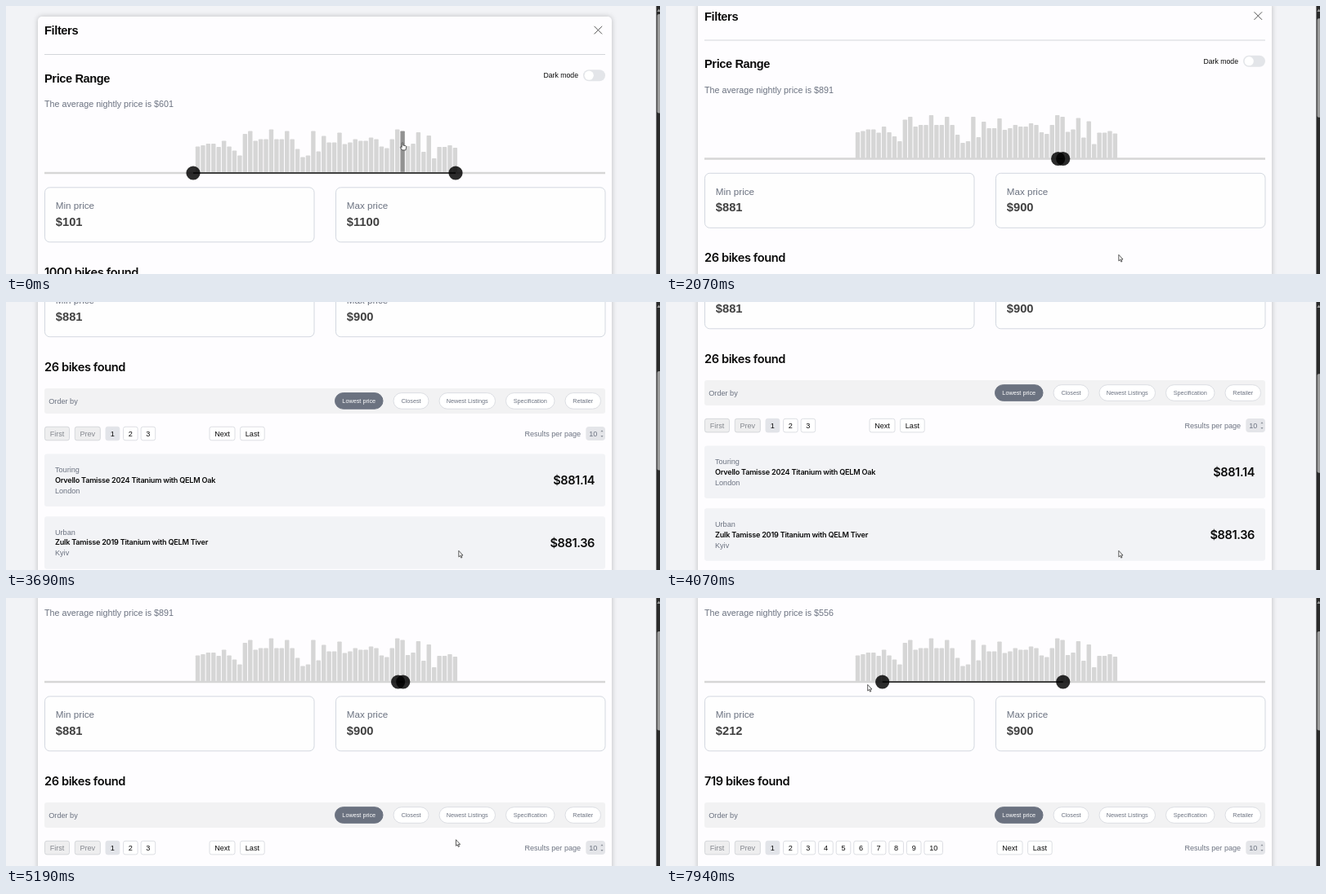
An HTML page that plays this animation: 800 px wide and 329 px high, repeating every 8 s.

```html
<!DOCTYPE html>
<html lang="en">
<head>
<meta charset="utf-8">
<title>Bike filters</title>
<style>
  html, body { margin: 0; width: 100%; height: 100%; overflow: hidden; background: #f2f3f6; }
  svg { display: block; width: 100vw; height: 100vh; }
  text { font-family: "Liberation Sans", Arial, sans-serif; font-size: 9.1px; fill: #6b7280; white-space: pre; }
  .head { font-size: 14.56px; font-weight: 700; letter-spacing: -.025em; fill: #0a0a0a; }
  .inter { font-family: Inter, sans-serif; font-weight: 600; letter-spacing: -.025em; fill: #0a0a0a; }
  .big { font-size: 14.56px; }
  .value { font-size: 14.7px; font-weight: 700; fill: #404040; }
  .label { font-size: 11.65px; }
  .average { font-size: 10.72px; }
  .small { font-size: 8.7px; fill: #0a0a0a; }
  .pill { font-size: 7.28px; }
  .dark { fill: #0a0a0a; }
  .white { fill: #fff; }
  .muted { fill: #85888f; }
  .middle { text-anchor: middle; }
  .end { text-anchor: end; }
  #card { filter: drop-shadow(0 0 3px rgba(0, 0, 0, .22)); }
</style>
</head>
<body>
<svg id="stage" viewBox="0 0 800 329" preserveAspectRatio="none"></svg>
<script>
const LOOP = 8000;
const FULL = { min: 101, max: 1100 };
const PICK = { min: 881, max: 900 };
const FINAL_MIN = 212;
const HOVERED = 39;
const BAR_STEP = 6.426;
const heights = [
  32, 33.5, 35.5, 35.5, 31.5, 39, 32, 27, 21, 47.5, 51, 39, 41, 41, 53, 41, 41, 51, 41, 29,
  19, 21, 51, 26, 45, 37, 37, 49, 35, 37, 41, 39, 39, 43, 41, 32, 30, 41, 53, 51,
  32.5, 35.5, 49.5, 25.5, 45.5, 17.5, 31.5, 31.5, 33.5, 30.5];

const scrollKeys = [[0, 0], [1000, 0], [1400, 17.5], [2350, 17.5], [3000, 214],
  [3450, 214], [3800, 257], [4250, 257], [4827, 102]];
const minKeys = [[6350, PICK.min], [7700, FINAL_MIN]];
const cursorX = [[600, 485], [1300, 553.8], [5050, 553.8], [6200, 472], [6350, 472], [7700, 257], [7880, 246.7]];
const cursorY = [[600, 167.5], [1300, 305.3], [5050, 305.3], [6200, 97.5], [6350, 97.5], [7700, 100], [7880, 106.3]];

function valueAt(keys, t) {
  if (t <= keys[0][0]) return keys[0][1];
  for (let i = 1; i < keys.length; i++) {
    const [t0, a] = keys[i - 1], [t1, b] = keys[i];
    if (t < t1) {
      const u = (t - t0) / (t1 - t0);
      return a + (b - a) * u * u * (3 - 2 * u);
    }
  }
  return keys[keys.length - 1][1];
}

const text = (x, y, content, cls = '', id = '') =>
  `<text x="${x}" y="${y}" class="${cls}"${id && ` id="${id}"`}>${content}</text>`;
const box = (x, y, w, h, r, fill, stroke = 'none', extra = '') =>
  `<rect x="${x}" y="${y}" width="${w}" height="${h}" rx="${r}" fill="${fill}" stroke="${stroke}" ${extra}/>`;
const button = (x, w, label, fill = '#fff', cls = 'dark', stroke = '#dcdee3') =>
  box(x, 400.3, w, 16.6, 2.5, fill, stroke) + text(x + w / 2, 411.8, label, cls + ' middle');
const pill = (x, w, label, active) =>
  box(x, 358.7, w, 19.6, 9.8, active ? '#6b7280' : '#fff', active ? '#6b7280' : '#dcdee3') +
  text(x + w / 2, 371.1, label, 'pill middle' + (active ? ' white' : ''));
const field = (x, label, id) =>
  box(x + .5, 222.8, 329.5, 67, 6, '#fefefe', '#d3d8e0') +
  text(x + 13.8, 249, label, 'label') + text(x + 13.8, 269.7, '', 'value', id);
const item = (y, kind, name, city, price) =>
  box(47, y, 686, 64.5, 3, '#f2f3f6') +
  text(60, y + 22.3, kind) + text(60, y + 35.2, name, 'inter') + text(60, y + 48.2, city) +
  text(720, y + 37.4, price, 'inter big end');
const bar = (h, i) =>
  box((231.8 + i * BAR_STEP).toFixed(2), 204.5 - h, 5.4, h, .8, '#d6d6d6', 'none', `id="bar${i}"`);

const stage = document.getElementById('stage');
stage.innerHTML = `
  <g id="page">
    ${box(39, 13, 702, 800, 5, '#fefdff', 'none', 'id="card"')}
    ${text(47, 35.2, 'Filters', 'head')}
    <path d="M719.5 24.8l9.6 9.6m0-9.6l-9.6 9.6" stroke="#555" stroke-width="1"/>
    <path d="M47 59.5H733" stroke="#d3d6da"/>
    ${text(47, 93.5, 'Price Range', 'head')}
    ${text(657.5, 88.3, 'Dark mode', 'small')}
    ${box(706, 78.2, 27, 14, 7, '#e3e5e9')}
    <circle cx="713.2" cy="85.2" r="5.6" fill="#fff"/>
    ${text(47, 124, '', 'average', 'average')}
    ${heights.map(bar).join('')}
    <path d="M47 205H733" stroke="#d6d6d6" stroke-width="2.4"/>
    <path id="range" stroke="#111" stroke-width="1.4"/>
    <circle id="minKnob" cy="205" r="8.6" fill="#000" fill-opacity=".83"/>
    <circle id="maxKnob" cy="205" r="8.6" fill="#000" fill-opacity=".83"/>
    ${field(47, 'Min price', 'minPrice')}
    ${field(403, 'Max price', 'maxPrice')}
    ${text(47, 331.6, '', 'inter big', 'found')}
    ${box(47, 353, 686, 31, 3, '#f2f2f3')}
    ${text(52.3, 371.9, 'Order by')}
    ${pill(402.5, 58.5, 'Lowest price', true)}
    ${pill(474, 43, 'Closest')}
    ${pill(530, 68.5, 'Newest Listings')}
    ${pill(611.5, 59.5, 'Specification')}
    ${pill(684, 43.5, 'Retailer')}
    ${button(47.5, 30, 'First', '#eeeeef', 'muted', '#d5d7db')}
    ${button(84.3, 31, 'Prev', '#eeeeef', 'muted', '#d5d7db')}
    <g id="pager"></g>
    ${text(634.4, 411.8, 'Results per page')}
    ${box(709.3, 400, 23.7, 17, 4, '#e4e5e9')}
    ${text(713.3, 411.8, '10')}
    <path d="M727.4 406.3l1.6-2 1.6 2zM727.4 411l1.6 2 1.6-2z" fill="#8b9099"/>
    ${item(433.5, 'Touring', 'Orvello Tamisse 2024 Titanium with QELM Oak', 'London', '$881.14')}
    ${item(510.3, 'Urban', 'Zulk Tamisse 2019 Titanium with QELM Tiver', 'Kyiv', '$881.36')}
  </g>
  ${box(795.4, 0, 5, 329, 0, '#2a2a2a')}
  <path d="M796.4 7l2.2-3.4 2.2 3.4z" fill="#9c9c9c"/>
  ${box(796.6, 0, 5, 121.5, 1.8, '#9c9c9c', 'none', 'id="thumb"')}
  <g id="cursor" fill="#fff" stroke="#333" stroke-width=".8" stroke-linejoin="round">
    <path id="arrow" d="M0 0V7.6L1.7 6.1 2.9 8.8 4.1 8.3 2.9 5.7H5.2Z"/>
    <path id="hand" d="M-.8 .7Q0-.5.8.7V3.6L4 4.2Q4.8 4.4 4.7 5.4L4 9.4H-.3L-2.8 6Q-2.4 4.8-.8 6Z"/>
  </g>`;

const el = id => document.getElementById(id);
const show = (id, visible) => el(id).setAttribute('visibility', visible ? 'visible' : 'hidden');
const knobX = price => 229 + (price - FULL.min) * .3213;

// Bikes in a price range, from the share of each bar it covers.
function countBikes(min, max) {
  const from = (min - FULL.min) / 20, to = (max + 1 - FULL.min) / 20;
  const area = heights.reduce((sum, h, i) =>
    sum + h * Math.max(0, Math.min(to, i + 1) - Math.max(from, i)), 0);
  return Math.round(area * .5376 - 1.42);
}

function drawPager(pages) {
  let x = 122, out = '';
  for (let n = 1; n <= pages; n++) {
    const w = n > 9 ? 22.5 : n > 1 ? 17.6 : 16.8;
    out += n === 1 ? button(x, w, n, '#e2e4e9', 'dark', '#e2e4e9') : button(x, w, n);
    x = n > 9 ? x + w + 4 : 122 + n * 21.55;
  }
  const next = pages > 9 ? 405 : 249 + (pages - 3) * 21.55;
  el('pager').innerHTML = out + button(next, 31, 'Next') + button(next + 37.6, 29.6, 'Last');
}

let shown = '';
function setRange(min, max) {
  const key = min + '-' + max;
  if (key === shown) return;
  shown = key;
  const bikes = countBikes(min, max), a = knobX(min), b = knobX(max);
  el('average').textContent = `The average nightly price is $${Math.round((min + max) / 2)}`;
  el('minPrice').textContent = '$' + min;
  el('maxPrice').textContent = '$' + max;
  el('found').textContent = `${bikes} bikes found`;
  el('minKnob').setAttribute('cx', a);
  el('maxKnob').setAttribute('cx', b);
  el('range').setAttribute('d', `M${a} 205H${b}`);
  drawPager(Math.min(10, Math.ceil(bikes / 10)));
}

function render(t) {
  const scroll = valueAt(scrollKeys, t);
  el('page').setAttribute('transform', `translate(0 ${-scroll})`);
  el('thumb').setAttribute('y', 10 + scroll * .304);

  if (t < 500) setRange(FULL.min, FULL.max);
  else setRange(Math.round(valueAt(minKeys, t)), PICK.max);

  el('bar' + HOVERED).setAttribute('fill', t < 650 ? '#929292' : '#d6d6d6');
  const pointing = t < 800 || (t > 6180 && t < 7750);
  show('hand', pointing);
  show('arrow', !pointing);
  el('cursor').setAttribute('transform', `translate(${valueAt(cursorX, t)} ${valueAt(cursorY, t)})`);
}

const start = performance.now();
function tick() {
  render((performance.now() - start) % LOOP);
  requestAnimationFrame(tick);
}
tick();
</script>
</body>
</html>
```
